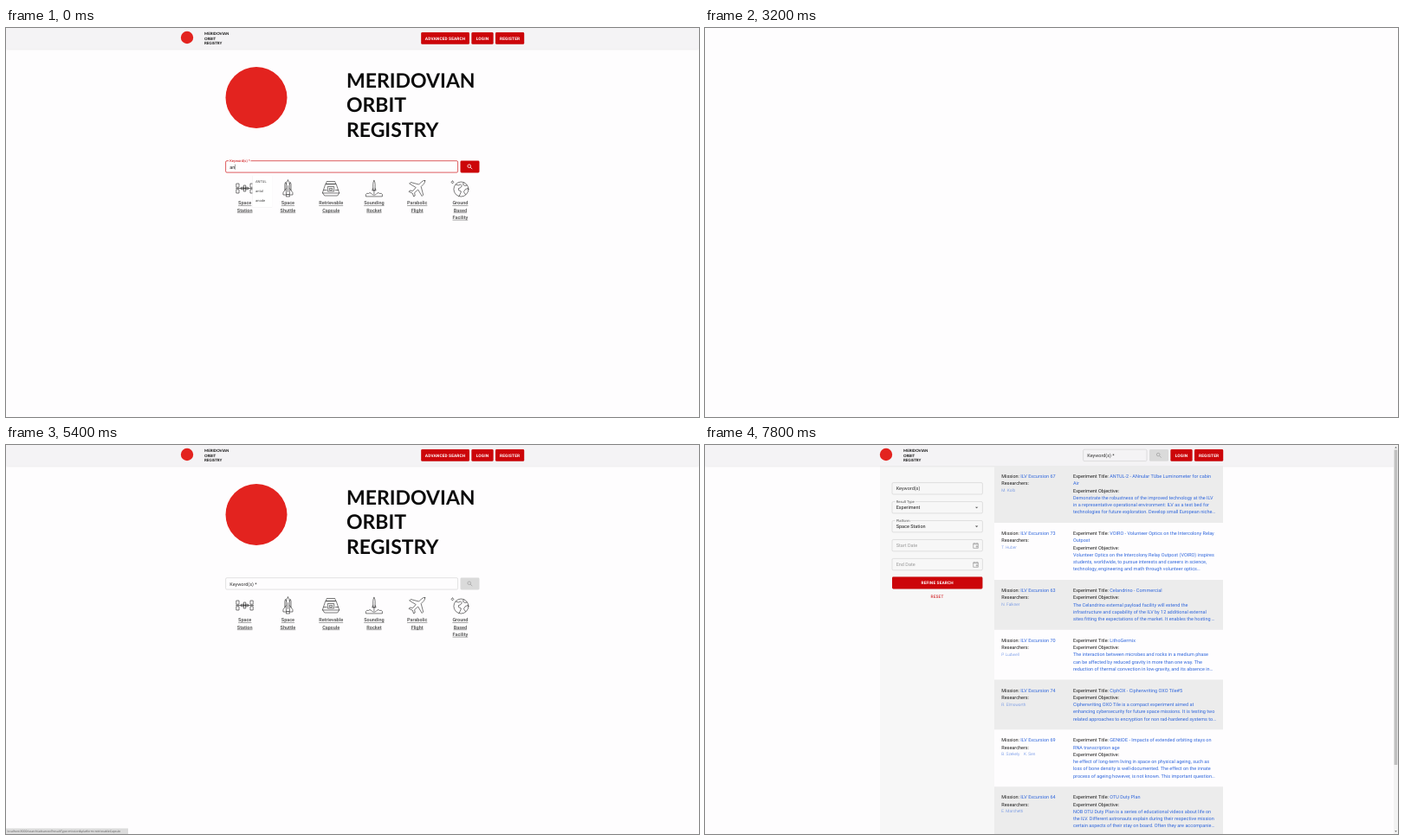
Recreate the animation shown at these times as an HTML page. Size 800 by 450 pixels, loop 8 s.

```html
<!DOCTYPE html>
<html lang="en">
<head>
<meta charset="utf-8">
<title>Space research registry</title>
<style>
html, body { margin: 0; width: 100%; height: 100%; overflow: hidden; background: #fefdfe; }
svg { display: block; width: 800px; height: 450px; }
text { font-family: Roboto, sans-serif; white-space: pre; text-rendering: geometricPrecision; }
.brand { font-family: Lato, sans-serif; }
.status { font-family: "Open Sans", sans-serif; }
.mid { text-anchor: middle; }
.link { text-anchor: middle; text-decoration: underline; }
.caps { text-anchor: middle; letter-spacing: .02857em; }
.bar { filter: drop-shadow(0 .7px 1.4px #0002); }
.card { filter: drop-shadow(0 1px 2px #0003); }
.flat { filter: drop-shadow(0 .6px .5px #0002); }
.icon { fill: none; stroke: #222; stroke-width: .6; stroke-linejoin: round; stroke-linecap: round; }
</style>
</head>
<body>
<svg id="stage" viewBox="0 0 800 450"></svg>
<script>
const RED = '#cc0509', BLUE = '#2f66dc', INK = '#1c1c1c', PAGE = '#fefdfe', PANEL = '#f7f7f7', STRIPE = '#ececec';

const text = (x, y, s, size = 5.5, fill = INK, weight = 400, cls = '') =>
  `<text x="${x}" y="${y}" font-size="${size}" fill="${fill}" font-weight="${weight}" class="${cls}">${s}</text>`;
const rect = (x, y, w, h, fill, extra = '') =>
  `<rect x="${x}" y="${y}" width="${w}" height="${h}" fill="${fill}" ${extra}/>`;
const path = (d, extra = '') => `<path d="${d}" ${extra}/>`;
const blue = s => `<tspan fill="${BLUE}">${s}</tspan>`;
const lines = (x, y, list, fill = INK) => list.map((s, i) => text(x, y + i * 8.25, s, 5.5, fill)).join('');

const button = (x, y, w, label) =>
  rect(x, y, w, 13.8, RED, 'rx="1.4" class="flat"') + text(x + w / 2, y + 8.6, label, 4.8, '#fff', 700, 'caps');

function searchButton(x, y, on) {
  return rect(x, y, 22, 13.8, on ? RED : '#dadada', 'rx="1.4"') +
    `<g transform="translate(${x + 11} ${y + 6.9})" fill="none" stroke="${on ? '#fff' : '#a3a3a3'}" stroke-width=".8">
     <circle cx="-.8" cy="-.8" r="1.8"/>${path('M.6 .6L2.7 2.7')}</g>`;
}

// Outlined input; the label floats on the border when there is a value
function field(x, y, w, label, value = '', { focus, off, arrow, cal, back = PANEL } = {}) {
  const mid = y + 6.9, ink = off ? '#9a9a9a' : '#333';
  let s = rect(x, y, w, 13.4, 'none', `rx="1.4" stroke="${focus ? RED : '#c0c0c0'}" stroke-width="${focus ? .65 : .45}"`);
  if (value) {
    s += rect(x + 3.5, y - 1, label.length * 1.95 + 2, 2, back) +
      text(x + 4.7, y + 1.5, label, 4.1, focus ? RED : '#555') + text(x + 4.7, mid + 1.95, value);
  } else s += text(x + 4.7, mid + 1.95, label, 5.5, ink);
  if (arrow) {
    const k = arrow == 'up' ? -1 : 1;
    s += path(`M${x + w - 8.5} ${mid - .8 * k}h3.4l-1.7 ${1.7 * k}z`, 'fill="#555"');
  }
  if (cal) s += path(`M${x + w - 10.7} ${mid - 2.4}h5.6v5.4h-5.6zm0 .8h5.6m-4.4-1.8v1m3.2-1v1m-.9 2.9h1.2v1.2h-1.2z`,
    `fill="none" stroke="${ink}" stroke-width=".7"`);
  return s;
}

function brand(cx, cy, r, x, y, size, step) {
  return `<circle cx="${cx}" cy="${cy}" r="${r}" fill="#e3231f"/>` +
    ['MERIDOVIAN', 'ORBIT', 'REGISTRY'].map((s, i) => text(x, y + i * step, s, size, '#0a0a0a', 700, 'brand')).join('');
}

// searchX: left edge of the header's search box, if it has one
function header(searchX, advanced = true) {
  return rect(0, 0, 800, 24, '#f4f3f5', 'class="bar"') + brand(209, 11, 7.2, 229, 8.2, 4.4, 5.4) +
    (searchX ? field(searchX, 5.2, 73.4, 'Keyword(s) *') + searchButton(searchX + 76.4, 5) : '') +
    (advanced ? button(479.2, 5, 55.8, 'ADVANCED SEARCH') : '') +
    button(537.4, 5, 25.2, 'LOGIN') + button(565, 5, 33.2, 'REGISTER');
}

const scrollbar = end => rect(795, 0, 5, 450, '#f3f3f3') + rect(795.6, 5.5, 3.7, end - 5.5, '#c0c0c0') +
  path('M796.2 3.6h2.6l-1.3-1.6zM796.2 446.2h2.6l-1.3 1.6z', 'fill="#555"');

const platforms = [
  ['Space,Station', 'M-10 0H10M-9.5-5.5h2.8v4.3h-2.8zm0 6.7h2.8v4.3h-2.8zM6.7-5.5h2.8v4.3H6.7zm0 6.7h2.8v4.3H6.7zM-4-1.2h3v2.4h-3zM1-1.2h3v2.4H1zM-1-3.5h2v7h-2z'],
  ['Space,Shuttle', 'M0-9.5q2 2 2 5V7h-4V-4.5q0-3 2-5zM-2 0L-5.5 5v2.5H-2M2 0L5.5 5v2.5H2M-3.6 2v-7l.8-2 .8 2M3.6 2v-7l-.8-2-.8 2M-1.2 7l-1 2.5h4.4l-1-2.5M0-3v7'],
  ['Retrievable,Capsule', 'M-4.5-8h9l1 3h-11zM-6-5h12l3.5 10.5h-19zM-9.5 5.5l2 3h15l2-3M-3.5-2h7v5.5h-7zM-1.5 0h3v2h-3zM-8.3 2h3M5.3 2h3'],
  ['Sounding,Rocket', 'M0-9q1.2 2 1.2 4V2h-2.4v-7q0-2 1.2-4zM-1.2 0l-1 2.5h4.4l-1-2.5M0 3v3M-9.5 9V7q1-2 3-1 1.5-2 3.5 0l1.5 1.5h3L3 6q2-2 3.500 0 2-1 3 1v2z'],
  ['Parabolic,Flight', 'M9-9q-2-.5-4 1.5L2-4.500-7.500-7-9-5.500-1.500-1-5 3l-3.500-.5L-9.500 4l4 1.500L-4 9.500l1.500-1L-3 5 1 1.500 5.500 9 7 7.500 4.500-2l3-3Q9.500-7 9-9z'],
  ['Ground,Based,Facility', 'M9.5 1a8.500 8.500 0 1 1-17 0a8.500 8.500 0 1 1 17 0zM-5-4.500l3 1 2-1 2 1.500L0-.5l-2 .5v2l3 1.500-1 3L-1.500 9M4-6.500l-1 2L5.500-3l2-.5M9 0L6 1 4 4l2 3M-9-8.500a1.300 1.300 0 1 0 .1 0']
];

const popup = () => rect(284.5, 171, 22.6, 36.5, '#fff', 'class="flat"') +
  ['ANTUL', 'antul', 'anode'].map((s, i) => text(288, 179 + i * 11.2, s, 4, '#444')).join('');

function home({ typed = '', list = false, hover = '' } = {}) {
  let s = header() + brand(289, 80.5, 35.5, 393, 68.5, 23, 28.5) +
    field(253.6, 153.7, 268, 'Keyword(s) *', typed, { focus: typed, back: PAGE }) + searchButton(524.5, 153.6, typed);
  if (typed) s += rect(258.6 + typed.length * 2.95, 157.7, .4, 6, INK);
  platforms.forEach(([label, d], i) => {
    const x = 275.7 + i * 49.74;
    s += path(d, `class="icon" transform="translate(${x} 185.5)"`) +
      label.split(',').map((w, j) => text(x, 204.3 + j * 8.25, w, 5.5, '#606060', 700, 'link')).join('');
  });
  if (list) s += popup();
  if (hover) s += rect(0, 443.5, 141, 6.5, '#dcdcdc') +
    text(1.5, 448.2, 'localhost:3000/search/advanced?resultType=mission&amp;platform=' + hover, 3.4, '#555', 400, 'status');
  return s;
}

const title = ['ANTUL-2 - ANnular TUbe Luminometer for cabin', 'Air'];

const found = ready => header(378.5) + scrollbar(422) + (ready ? rect(202, 24, 396, 58, STRIPE) +
  lines(210.3, 38, ['Mission: ' + blue('ILV Excursion 67'), 'Researchers:']) +
  text(210.3, 54, 'M. Kolb', 4.8, '#6f95e8', 300) +
  lines(337, 38, ['Experiment Title: ' + blue(title.join(' ')), 'Experiment Objective:']) +
  lines(337, 54.5, [
    'Demonstrate the robustness of the improved technology at the ILV in a representative operational',
    'environment: ILV as a test bed for technologies for future exploration. Develop small European niches in',
    'the area of life support based on state of the art te'], BLUE) : '');

function detail() {
  const box = (x, y, w, h) => rect(x, y, w, h, '#fff', 'rx="1.4" class="flat"');
  const item = (x, y, head, ...body) => text(x, y, head, 8.25, RED, 700) + lines(x, y + 9, body);
  return rect(253.5, 20, 293, 362, '#fff', 'rx="2" class="card"') + header(378.5) +
    text(262, 43.6, title.join(' '), 11.7, '#080808', 700) +
    [55.5, 158.5, 263.3].map(y => rect(262, y - .6, 276, 1.3, RED)).join('') +
    box(262, 64, 134, 86) + box(404.5, 64, 133.5, 86) + box(262, 167, 276, 87.3) + box(262, 272, 276, 102) +
    item(267.2, 78.3, 'Mission', 'ILV Excursion 67 (2020)') +
    item(267.2, 105.9, 'Platform', 'Space Station') +
    item(267.2, 133.3, 'Activity', 'Scientific Research') +
    item(409.7, 78.3, 'Type of Activity (ToA)', 'Experimental Development') +
    item(409.7, 105.9, 'Field of Research (FoR)', '39 Education') +
    item(409.7, 133.3, 'Socio-Economic Objective (SEO)', '18 Environmental Management') +
    item(267.2, 181.4, 'Researchers') + text(267.2, 190.3, 'Matthias Kolb', 5.5, INK, 700) +
    ['Principal Investigator', 'Nordavian Orbit Board', 'Erlangen, Bavaria, Germany']
      .map((s, i) => text(267.2, 197.7 + i * 6.85, s, 4.8)).join('') +
    item(267.2, 238, 'Lead Institution', 'NOB-NOLEC') +
    item(267.2, 286, 'Experiment Objectives',
      'Demonstrate the robustness of the improved technology at the ILV in a representative operational',
      'environment: ILV as a test bed for technologies for future exploration. Develop small European niches in the',
      'area of life support based on state of the art te') +
    item(267.2, 330, 'Experiment Publications', 'None found.') +
    item(267.2, 357.4, 'Experiment Attachments', 'None found.');
}

const missions = [[65, 2021], [67, 2020], [63, 2020], [69, 2020], [68, 2020], [70, 2020], [74, 2019], [71, 2018]];

function pager() {
  return ['', 1, 2, ''].map((page, i) => {
    const x = 446.5 + i * 13, on = page == 1, k = i ? 1 : -1;
    return rect(x - 5.3, 359.6, 10.6, 10.6, on ? '#fbdcdc' : '#fff', `rx="1.4" stroke="${on ? '#e59a9a' : '#d5d5d5'}" stroke-width=".4"`) +
      (page ? text(x, 366.9, page, 4.8, on ? RED : INK, 400, 'mid')
        : path(`M${x - .7 * k} 363.3l${1.5 * k} 1.6 ${-1.5 * k} 1.6`, `fill="none" stroke="${i ? '#222' : '#aaa'}" stroke-width=".7"`));
  }).join('');
}

function missionList() {
  return missions.map(([n, year], i) => {
    const y = 24 + i * 41.25, day = 'January 1st ' + year;
    return (i % 2 ? '' : rect(334, y, 264, 41.25, STRIPE)) +
      lines(342.3, y + 14, ['Name: ' + blue('ILV Excursion ' + n), 'Platform: ' + blue('Space Station'), 'Total Experiments: ' + blue(1)]) +
      lines(466, y + 14, ['Launch Date: ' + blue(`${day} (${2023 - year} years ago)`), 'Start Date: ' + blue(day), 'End Date: ' + blue(day)]);
  }).join('') + pager();
}

const experiments = [
  [67, 'M. Kolb', title,
    ['Demonstrate the robustness of the improved technology at the ILV', 'in a representative operational environment: ILV as a test bed for', 'technologies for future exploration. Develop small European niche…']],
  [73, 'T. Huber', ['VOIRO - Volunteer Optics on the Intercolony Relay', 'Outpost'],
    ['Volunteer Optics on the Intercolony Relay Outpost (VOIRO) inspires', 'students, worldwide, to pursue interests and careers in science,', 'technology, engineering and math through volunteer optics…']],
  [63, 'N. Falkner', ['Celandrino - Commercial'],
    ['The Celandrino external payload facility will extend the', 'infrastructure and capability of the ILV by 12 additional external', 'sites fitting the expectations of the market. It enables the hosting …']],
  [70, 'P. Ludwell', ['LithoGermix'],
    ['The interaction between microbes and rocks in a medium phase', 'can be affected by reduced gravity in more than one way. The', 'reduction of thermal convection in low-gravity, and its absence in…']],
  [74, 'R. Elmsworth', ['CiphOX - Cipherwriting OXO Tile#5'],
    ['Cipherwriting OXO Tile is a compact experiment aimed at', 'enhancing cybersecurity for future space missions. It is testing two', 'related approaches to encryption for non rad-hardened systems to…']],
  [69, 'B. Szekely    K. Sen', ['GENtIDE - Impacts of extended orbiting stays on', 'RNA transcription age'],
    ['he effect of long-term living in space on physical ageing, such as', 'loss of bone density is well-documented. The effect on the innate', 'process of ageing however, is not known. This important question…']],
  [64, 'E. Marchetti', ['OTU Duty Plan'],
    ['NOB OTU Duty Plan is a series of educational videos about life on', 'the ILV. Different astronauts explain during their respective mission', 'certain aspects of their stay on board. Often they are accompanie…']]
];

function experimentList() {
  let y = 24;
  return experiments.map(([n, who, [head, ...rest], body], i) => {
    const h = 57.75 + rest.length * 8.25, top = y;
    y += h;
    return (i % 2 ? '' : rect(334, top, 264, h, STRIPE)) +
      lines(342.3, top + 14, ['Mission: ' + blue('ILV Excursion ' + n), 'Researchers:']) +
      text(342.3, top + 30, who, 4.8, '#4f7de2', 300) +
      lines(425, top + 14, ['Experiment Title: ' + blue(head), ...rest.map(blue), 'Experiment Objective:', ...body.map(blue)]);
  }).join('');
}

function advanced({ type = 'Mission', menu = false, list = '', end = 422 } = {}) {
  const off = type == 'Experiment';
  const put = (i, label, value, opts) => field(216, 43.6 + i * 21.95, 104.4, label, value, opts);
  let s = rect(202, 24, 132, 425.5, PANEL) + header(436.6, false) + put(0, 'Keyword(s)') +
    put(1, 'Result Type', type, { focus: menu, arrow: menu ? 'up' : 'down' }) +
    put(2, 'Platform', 'Space Station', { arrow: 'down' }) +
    put(3, 'Start Date', '', { off, cal: true }) + put(4, 'End Date', '', { off, cal: true }) +
    button(216, 152.6, 104.4, 'REFINE SEARCH') + text(268, 176.9, 'RESET', 4.8, RED, 400, 'caps') + list;
  if (menu) s += rect(216, 79.5, 104.4, 54.5, '#fff', 'rx="1.4" class="card"') + rect(216, 82, 104.4, 12.4, '#f4f4f4') +
    ['Experiment', 'Mission', 'Field of Research (FoR)', 'Socio-Economic Objective (SEO)']
      .map((t, i) => text(221.5, 89.7 + i * 12.4, t)).join('');
  return s + (menu ? '' : scrollbar(end));
}

const scenes = [
  [0, () => home({ typed: 'an', list: true })],
  [200, () => home({ typed: 'ANTUL' })],
  [600, () => found(false)],
  [800, () => found(true)],
  [1400, detail],
  [3200, () => ''],
  [3400, () => home()],
  ...['spaceStation', 'spaceShuttle', 'retrievableCapsule', 'soundingRocket', 'parabolicFlight', 'groundBasedFacility', 'retrievableCapsule', 'spaceStation']
    .map((hover, i) => [4200 + i * 200, () => home({ hover })]),
  [5800, () => advanced()],
  [6000, () => advanced({ list: missionList() })],
  [6400, () => advanced({ list: missionList(), menu: true })],
  [6800, () => advanced({ list: missionList(), type: 'Experiment' })],
  [7400, () => advanced({ list: experimentList(), type: 'Experiment', end: 370 })]
];

const stage = document.getElementById('stage');
let shown;
function tick() {
  const t = performance.now() % 8000;
  const scene = scenes.findLast(([start]) => start <= t);
  if (scene != shown) stage.innerHTML = rect(0, 0, 800, 450, PAGE) + scene[1]();
  shown = scene;
  requestAnimationFrame(tick);
}
tick();
</script>
</body>
</html>
```
